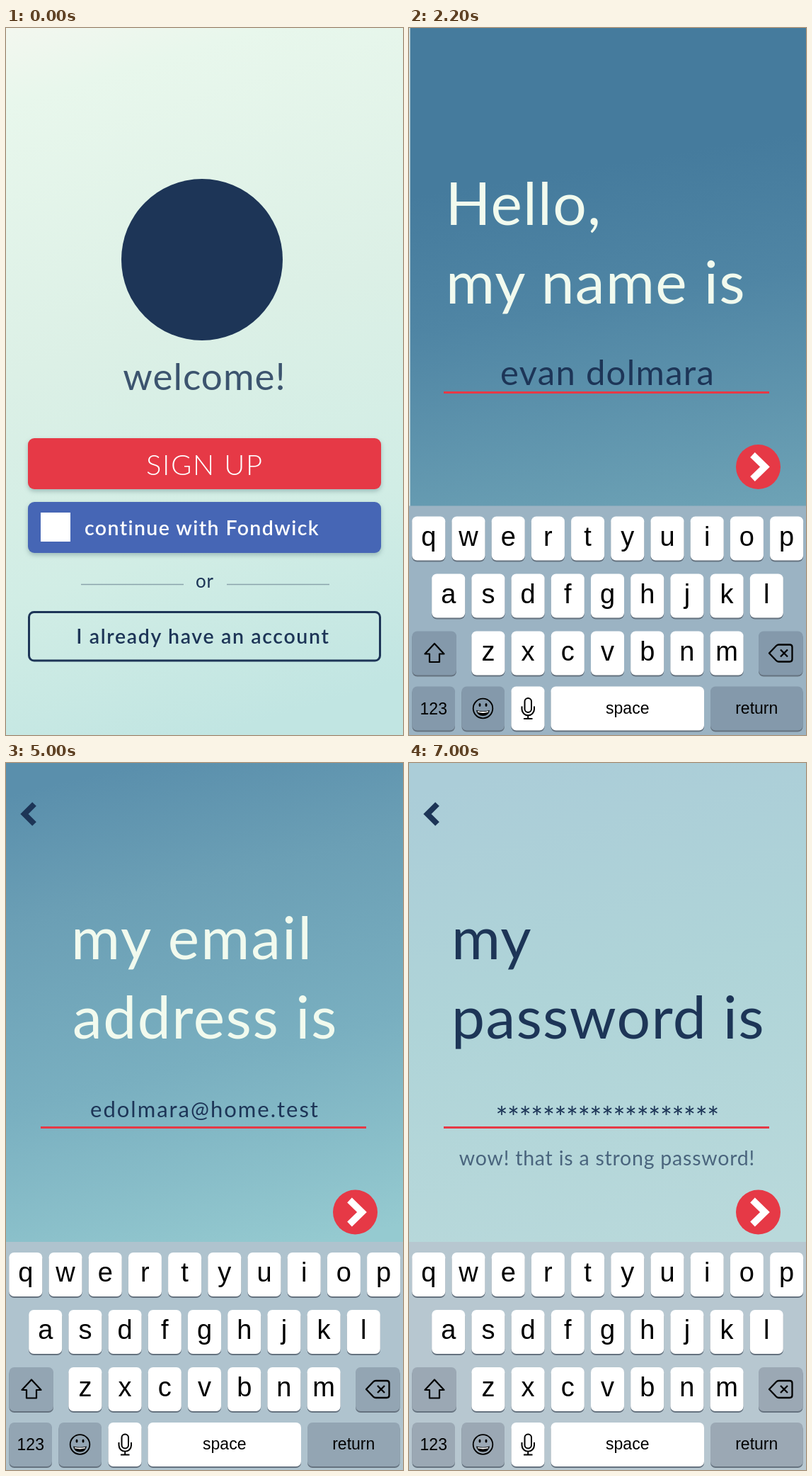
These frames come from a looping animation (561 by 998 pixels, 8 s). An HTML page:

```html
<!DOCTYPE html>
<html lang="en">
<head>
<meta charset="utf-8">
<title>Sign-up flow</title>
<style>
  html, body { margin: 0; width: 100%; height: 100%; overflow: hidden; }
  svg { display: block; width: 100vw; height: 100vh; font-family: Lato, sans-serif; }
  .keys { font-family: "Liberation Sans", Arial, sans-serif; text-anchor: middle; }
  .raised { filter: drop-shadow(0 3px 3px rgba(30, 70, 80, .3)); }
</style>
</head>
<body>
<svg id="stage" viewBox="0 0 561 998" preserveAspectRatio="none"></svg>
<script>
const NAVY = '#1d3557', RED = '#e63946', CREAM = '#f1faee';
const LOOP = 8000;

const text = (x, y, size, spacing, fill, string, extra = '') =>
  `<text x="${x}" y="${y}" font-size="${size}" letter-spacing="${spacing}" fill="${fill}" ${extra}>${string}</text>`;
const centred = (x, y, size, spacing, fill, string, extra = '') =>
  text(x + spacing / 2, y, size, spacing, fill, string, `text-anchor="middle" ${extra}`);
const rect = (x, y, w, h, fill, rx = 0, extra = '') =>
  `<rect x="${x}" y="${y}" width="${w}" height="${h}" rx="${rx}" fill="${fill}" ${extra}/>`;
const stroke = (d, colour, width, extra = '') =>
  `<path d="${d}" fill="none" stroke="${colour}" stroke-width="${width}" ${extra}/>`;

// Full-stage gradient along (x1,y1)-(x2,y2); stops are [offset, colour] pairs.
function background(id, [x1, y1, x2, y2], stops) {
  const list = stops.map(([o, c]) => `<stop offset="${o}" stop-color="${c}"/>`).join('');
  return `<linearGradient id="${id}" gradientUnits="userSpaceOnUse"
    x1="${x1}" y1="${y1}" x2="${x2}" y2="${y2}">${list}</linearGradient>` +
    rect(0, 0, 561, 998, `url(#${id})`);
}

function key(x, y, w, fill, label = '', size = 38, baseline = 41) {
  return rect(x, y + 2, w, 62, '#65727f', 7) + rect(x, y, w, 62, fill, 7) +
    `<text x="${x + w / 2}" y="${y + baseline}" font-size="${size}">${label}</text>`;
}

const keyIcons =
  stroke('M36 870.5L49.5 885H43V896.5H29V885H22.5Z', '#000', 2.2, 'stroke-linejoin="round"') +
  stroke('M509 884L519 873.5Q520.5 872 522.5 872H538Q541.5 872 541.5 875.5V892.5Q541.5 896 538 896H522.5Q520.5 896 519 894.5ZM525 879L535 889M535 879L525 889',
    '#000', 2.3, 'stroke-linejoin="round"') +
  `<circle cx="104.500" cy="962" r="13.800" fill="none" stroke="#000" stroke-width="1.800"/>
   <ellipse cx="100" cy="957" rx="1.500" ry="2.500"/><ellipse cx="109" cy="957" rx="1.500" ry="2.500"/>
   <path d="M95 964.500Q104.500 967 114 964.500Q112.500 972.500 104.500 972.500T95 964.500Z"/>` +
  stroke('M97 966.5Q104.5 968.5 112 966.5', '#fff', 1.8) +
  rect(163.5, 947.5, 9.5, 20, 'none', 4.75, 'stroke="#000" stroke-width="2"') +
  stroke('M159.5 959V963A8.7 8.7 0 0 0 177 963V959M168.2 972V976.5M162 976.5H174.5', '#000', 2);

function keyboard(tray, dark, dy = 0) {
  const row = (letters, x, y) =>
    [...letters].map((c, i) => key(x + 56.2 * i, y, 47, '#fff', c)).join('');
  return `<g class="keys" transform="translate(0 ${dy})">` +
    rect(0, 676, 561, 330, tray) +
    row('qwertyuiop', 4.3, 691) + row('asdfghjkl', 32.2, 772) + row('zxcvbnm', 88.4, 853) +
    key(4.5, 853, 62.5, dark) + key(494, 853, 62.5, dark) +
    key(4.5, 931, 60.5, dark, '123', 23, 39) + key(74.5, 931, 60.5, dark) +
    key(144.5, 931, 47, '#fff') + key(200.5, 931, 216.5, '#fff', 'space', 23, 38) +
    key(426, 931, 130.5, dark, 'return', 23, 38) + keyIcons + '</g>';
}

const underline = stroke('M49 514.5H509', RED, 3);
const back = stroke('M40 58L26 72L40 86', NAVY, 8);
const next = y => `<g transform="translate(493.5 ${y})"><circle r="31.5" fill="${RED}"/>` +
  stroke('M-8 -17L9.5 0L-8 17', '#fff', 9.5) + '</g>';

const coolFace = `<radialGradient id="gold" cx=".5" cy=".35" r=".65">
    <stop offset=".35" stop-color="#ffdc4a"/><stop offset="1" stop-color="#f29a1c"/></radialGradient>
  <circle cx="474.5" cy="483" r="22" fill="url(#gold)"/>
  <path fill="#20242b" d="M453 473Q464 470 474.5 475Q485 470 496 473V477Q494 478 493.5 482Q492 491 485 491Q477 491 476 480H473Q472 491 464 491Q457 491 455.5 482Q455 478 453 477Z"/>` +
  stroke('M458 477L463 474.5M480 477L485 474.5', '#6f7681', 2) +
  stroke('M465 495Q474.5 501 484 495', '#7a3f10', 2.4, 'stroke-linecap="round"');

const welcome =
  background('mint', [0, 0, 300, 998], [[0, '#f3f7ef'], [.1, '#e8f7ec'], [.45, '#dcf0e6'], [.75, '#d1ede5'], [1, '#c1e5e2']]) +
  `<circle cx="277" cy="327" r="114" fill="${NAVY}"/>` +
  centred(280, 511, 53, 1, NAVY, 'welcome!', 'opacity=".83"') +
  rect(31, 579, 499, 72, RED, 9, 'class="raised"') +
  centred(280, 631, 40, 1.6, '#fff', 'SIGN UP', 'font-weight="300"') +
  rect(31, 669, 499, 72, '#4666b5', 9, 'class="raised"') +
  rect(49, 684, 42, 41, '#fff') +
  text(111, 716, 28.5, 1.4, '#fff', 'continue with Fondwick', 'font-weight="600"') +
  stroke('M106 785.5H251M312 785.5H457', '#8aa3ab', 1.4) +
  centred(280.5, 790, 26, .6, NAVY, 'or') +
  rect(32.5, 824.5, 496, 68.5, 'none', 7, `stroke="${NAVY}" stroke-width="3"`) +
  centred(277.5, 869, 28.5, 1.65, NAVY, 'I already have an account', 'font-weight="600"');

const name =
  background('deep', [230, 200, 320, 740], [[0, '#457b9d'], [.35, '#4f85a4'], [1, '#70a5b7']]) +
  rect(0, 0, 1.6, 675, '#dcebec') +
  text(51.5, 278, 84, 1.2, CREAM, 'Hello,') +
  text(52, 389, 84, 1.3, CREAM, 'my name is') +
  centred(280, 504, 49, 1.3, NAVY, 'evan dolmara') +
  underline + next(619.5) + keyboard('#9bb3c3', '#8499ab', -1.5);

const username =
  background('mid', [230, 0, 320, 690], [[0, '#457b9f'], [.35, '#588eab'], [.7, '#6ca2b6'], [1, '#80b6c4']]) +
  back +
  text(66, 232, 72, -.8, CREAM, 'I’d like my') +
  text(66, 326, 72, 1.1, CREAM, 'username to') +
  text(66, 420, 72, 1.1, CREAM, 'be') +
  centred(280, 500, 48, 1.8, NAVY, 'edolmara') +
  coolFace + underline + next(634) + keyboard('#a5bac7', '#8c9eae');

const email =
  background('pale', [190, 0, 360, 700], [[0, '#5a8fac'], [.25, '#6b9fb5'], [.6, '#79afc0'], [1, '#95cad0']]) +
  back +
  text(92, 277, 84, 2, CREAM, 'my email') +
  text(94, 389, 84, 1.5, CREAM, 'address is') +
  centred(280, 500, 31, 2, NAVY, 'edolmara@home.test') +
  underline + next(634) + keyboard('#afc3ce', '#93a5b3');

const starPositions = Array.from({ length: 19 }, (_, i) => 131 + 16.6 * i).join(' ');
const password =
  background('light', [200, 0, 360, 700], [[0, '#abcdd8'], [.45, '#afd4d8'], [1, '#b9d9db']]) +
  back +
  text(60, 277, 84, 1.3, NAVY, 'my') +
  text(60, 389, 84, 1.3, NAVY, 'password is') +
  text(starPositions, 515, 40, 0, NAVY, '*'.repeat(19), 'text-anchor="middle"') +
  underline +
  centred(279.5, 568, 28.5, .77, NAVY, 'wow! that is a strong password!', 'opacity=".7"') +
  next(634) + keyboard('#b7c7d0', '#9ba8b4');

const scenes = [[0, welcome], [1000, name], [3000, username], [5000, email], [7000, password]];
const stage = document.getElementById('stage');
stage.innerHTML = scenes.map(([, body]) => `<g visibility="hidden">${body}</g>`).join('');
const groups = [...stage.children];

function draw() {
  const t = performance.now() % LOOP;
  const current = scenes.findLastIndex(([start]) => t >= start);
  groups.forEach((g, i) => g.setAttribute('visibility', i === current ? 'visible' : 'hidden'));
  requestAnimationFrame(draw);
}
draw();
</script>
</body>
</html>
```
